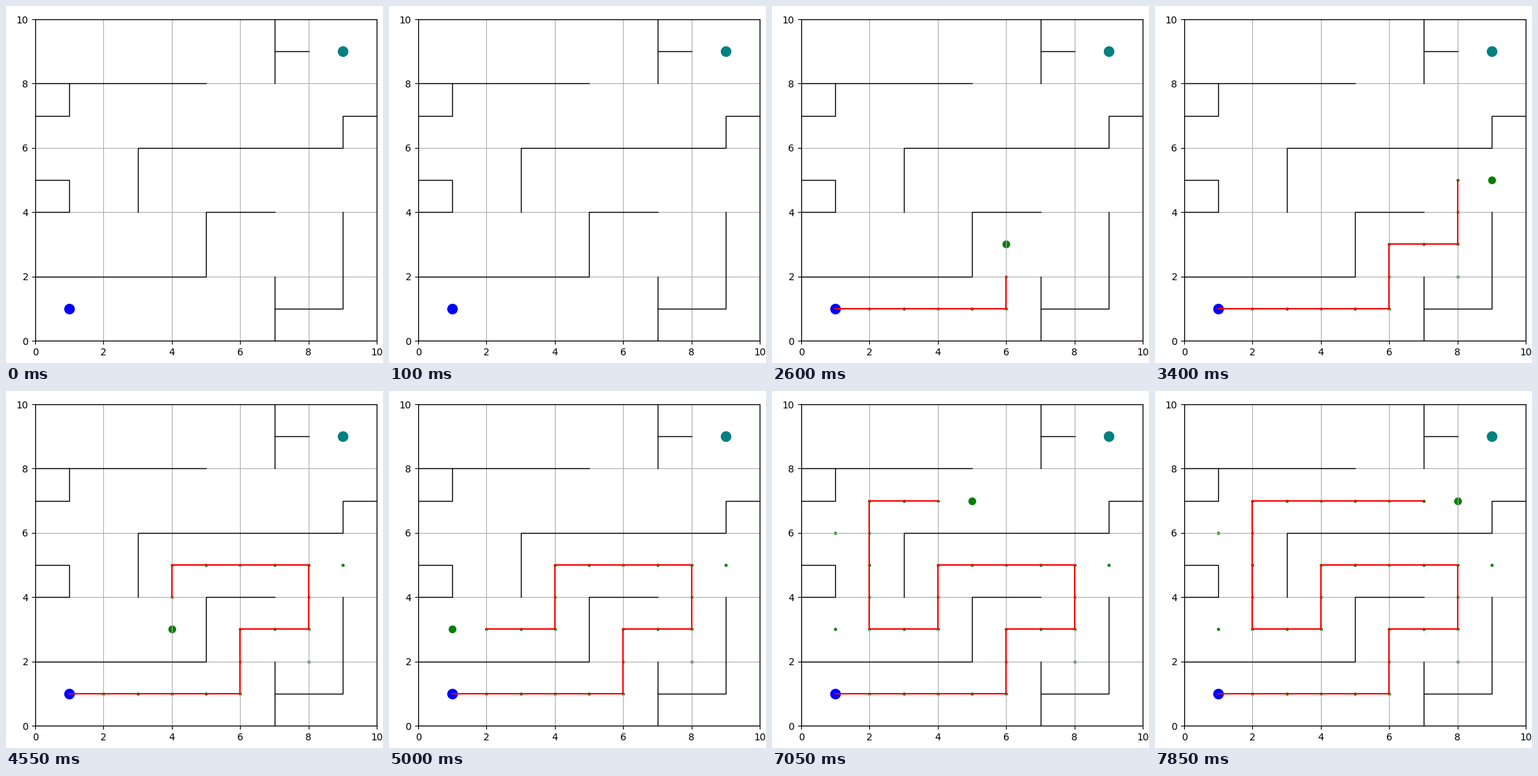
Recreate the animation shown at these times as a matplotlib script. Size 543 by 513 pixels, loop 8 s.

```python
import matplotlib.pyplot as plt
import numpy as np
from matplotlib.animation import FuncAnimation

W, H, DPI = 543, 513, 100
LOOP, TICK = 8000, 50

# Each wall is a polyline given by its corners
WALLS = [
    [(0, 0), (10, 0), (10, 10), (0, 10), (0, 0)],
    [(7, 10), (7, 8)],
    [(7, 9), (8, 9)],
    [(0, 8), (5, 8)],
    [(1, 8), (1, 7), (0, 7)],
    [(10, 7), (9, 7), (9, 6), (3, 6), (3, 4)],
    [(0, 5), (1, 5), (1, 4), (0, 4)],
    [(0, 2), (5, 2), (5, 4), (7, 4)],
    [(7, 0), (7, 2)],
    [(7, 1), (9, 1), (9, 4)],
]
START, GOAL = (1, 1), (9, 9)
CORNERS = [START, (6, 1), (6, 3), (8, 3), (8, 5), (4, 5), (4, 3), (2, 3), (2, 7), (8, 7)]
# Dead ends, each tried just before the given cell of the route
DEAD_ENDS = {(8, 4): (8, 2), (7, 5): (9, 5), (2, 4): (1, 3), (2, 7): (1, 6)}

# The search runs in bursts: time in ms and number of cells left behind
PACE_TIME = [2100, 2950, 3400, 4050, 4550, 5000, 5450, 7850]
PACE_CELL = [3, 11, 13, 17, 19, 22, 24, 33]


def walk(corners):
    """Every cell along a polyline of axis-aligned legs."""
    cells = [corners[0]]
    for a, b in zip(corners, corners[1:]):
        n = max(abs(b[0] - a[0]), abs(b[1] - a[1]))
        cells += [tuple(p) for p in np.linspace(a, b, n + 1).round().astype(int)[1:].tolist()]
    return cells


def search_order():
    """Route cells with the dead ends slotted in."""
    for cell in walk(CORNERS):
        if cell in DEAD_ENDS:
            yield DEAD_ENDS[cell]
        yield cell


VISITS = list(search_order())
DEAD = set(DEAD_ENDS.values())
NOWHERE = [(np.nan, np.nan)]

fig = plt.figure(figsize=((W + 0.001) / DPI, (H + 0.001) / DPI), dpi=DPI, facecolor="white")
ax = fig.add_axes([42.05 / W, 32 / H, 492.1 / W, 462 / H])
ax.set(xlim=(0, 10), ylim=(0, 10))
ax.grid(True)

for wall in WALLS:
    ax.plot(*zip(*wall), color="black", lw=1)
ax.scatter(*START, s=100, color="blue")
ax.scatter(*GOAL, s=100, color="teal")
dots = ax.scatter([], [], s=5, color="green")
head = ax.scatter([], [], s=50, color="green")
trail, = ax.plot([], [], color="red", lw=1.5)


def draw(frame):
    count = int(np.interp(frame * TICK, PACE_TIME, PACE_CELL, left=0) + 0.01)
    seen = VISITS[:count]
    path = [c for c in seen if c not in DEAD]
    trail.set_data([x for x, _ in path], [y for _, y in path])
    dots.set_offsets(seen[1:] or NOWHERE)
    head.set_offsets([VISITS[count]] if seen else NOWHERE)
    return dots, head, trail


anim = FuncAnimation(fig, draw, frames=LOOP // TICK, interval=TICK,
                     repeat=True, repeat_delay=0, blit=False)
plt.show()
```
